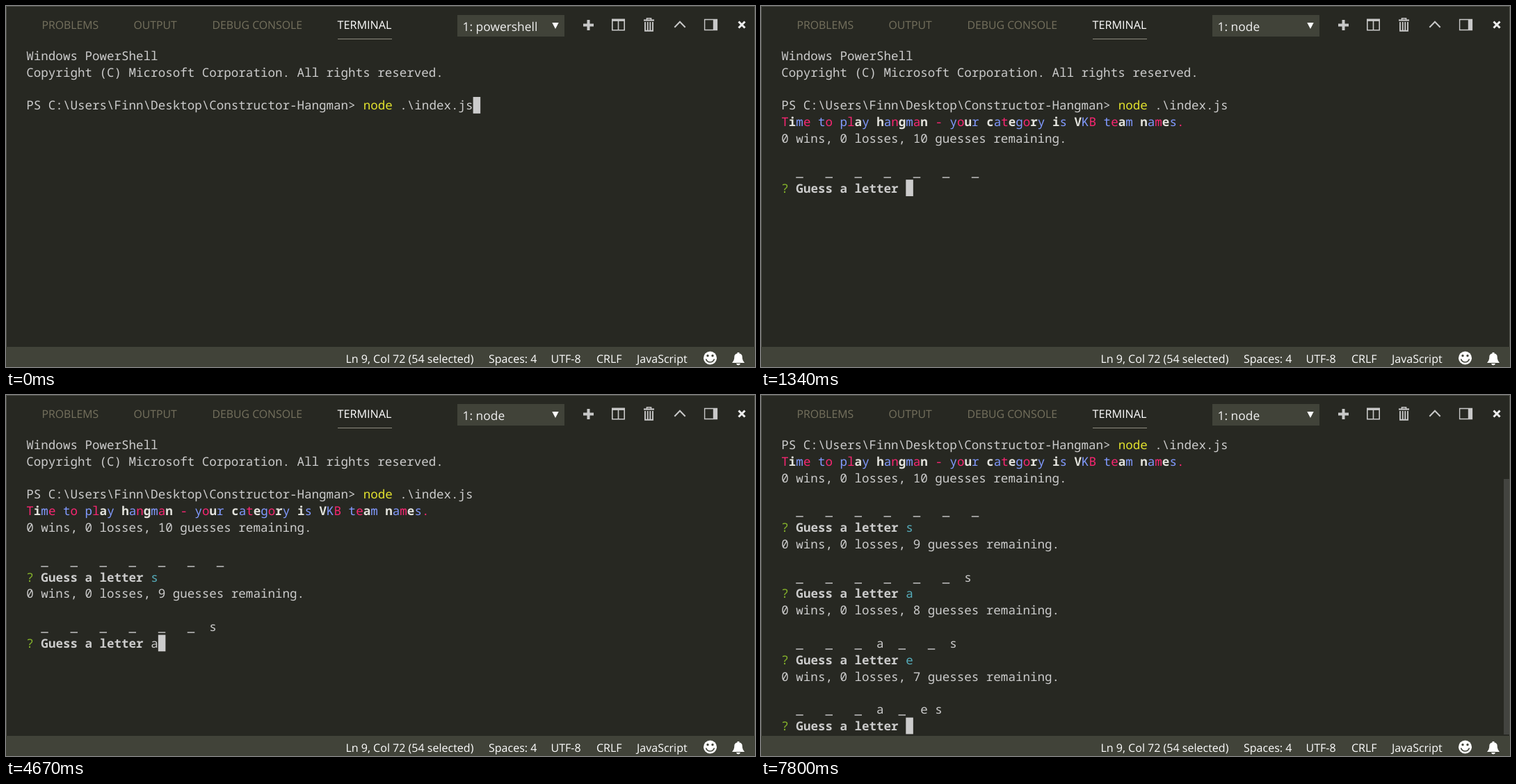
Write an HTML page that moves like this. It is 1077x520 px and loops after 8 s.

```html
<!DOCTYPE html>
<html lang="en">
<head>
<meta charset="utf-8">
<title>Terminal hangman</title>
<style>
  html, body { margin: 0; width: 100%; height: 100%; overflow: hidden; background: #272822; }
  svg { display: block; width: 100%; height: 100%; }
  text { white-space: pre; text-rendering: geometricPrecision; }
  .ui { font-family: "Open Sans", "Noto Sans", sans-serif; }
  .tabs { font-size: 15.8px; fill: #75715e; }
  .tabs .on { font-size: 16.2px; fill: #fff; }
  .status { font-size: 16.05px; fill: #fff; }
  #shell { font-size: 17.4px; fill: #f0f0f0; }
  #term { font: 500 17.55px "Noto Sans Mono", "DejaVu Sans Mono", monospace; fill: #ccc; }
  #term .bold { font-weight: 700; }
  #term .white { font-weight: 700; fill: #e3e3dd; }
  .red { fill: #f92672; }
  .blue { fill: #819aff; }
  .yellow { fill: #e2e22e; }
  .green { fill: #86b42b; }
  .cyan { fill: #56adbc; }
</style>
</head>
<body>
<svg viewBox="0 0 1077 520" xmlns="http://www.w3.org/2000/svg">
  <rect width="1077" height="520" fill="#272822"/>
  <path d="M0.5 491V0.5H1076.5V491" fill="none" stroke="#50514a"/>

  <g class="ui tabs">
    <text x="51.5" y="33">PROBLEMS</text>
    <text x="183.5" y="33">OUTPUT</text>
    <text x="296.5" y="33">DEBUG CONSOLE</text>
    <text x="476.5" y="33" class="on">TERMINAL</text>
  </g>
  <rect x="477" y="47" width="78" height="1" fill="#8f8d80"/>

  <rect x="649" y="13" width="154" height="31" fill="#414339"/>
  <text id="shell" class="ui" x="656.5" y="36"></text>
  <path d="M785.3 24H794.7L790 33Z" fill="#fff"/>

  <g fill="none" stroke="#c8c8c8">
    <path d="M837.5 20V35M830 27.5H845" stroke-width="4"/>
    <path d="M871.8 20V34.7H889.2V20M880.5 20V35" stroke-width="1.6"/>
    <path d="M871 20.2H890" stroke-width="3.4"/>
    <path d="M917 20.5H932" stroke-width="2.2"/>
    <path d="M921.5 20V17.8H927.5V20" stroke-width="1.6"/>
    <path d="M919 23V35.8H930V23M922.7 23V35M926.3 23V35" stroke-width="1.9"/>
    <path d="M961.3 30.7L969 22.7L976.7 30.7" stroke-width="2"/>
    <path d="M1004.6 19.5H1022.4V34.5H1004.6Z" stroke-width="1.4"/>
    <path d="M1019.8 19V35" stroke-width="6"/>
    <path d="M1053.5 22.5L1062.5 31.5M1062.5 22.5L1053.5 31.5" stroke="#eee" stroke-width="3"/>
  </g>

  <g id="term"></g>
  <rect id="cursor" fill="#ccc"/>
  <rect id="scrollbar" x="1068" y="121" width="8" height="368" fill="#434440"/>

  <rect y="491" width="1077" height="29" fill="#414339"/>
  <g class="ui status">
    <text x="488.5" y="514">Ln 9, Col 72 (54 selected)</text>
    <text x="694" y="514">Spaces: 4</text>
    <text x="783.5" y="514">UTF-8</text>
    <text x="849" y="514">CRLF</text>
    <text x="907" y="514">JavaScript</text>
  </g>
  <circle cx="1012.5" cy="507" r="9.5" fill="#fff"/>
  <g fill="#414339">
    <circle cx="1009" cy="503.8" r="1.7"/>
    <circle cx="1016" cy="503.8" r="1.7"/>
  </g>
  <path d="M1006.5 508.5Q1008 513 1012.5 513T1018.5 508.5" fill="none" stroke="#414339" stroke-width="1.7"/>
  <path d="M1044 514Q1047.3 511 1047.3 505.5Q1047.3 501.3 1051.6 500.5V499H1054.4V500.5Q1058.7 501.3 1058.7 505.5Q1058.7 511 1062 514ZM1050 515H1056Q1055.5 517.4 1053 517.4T1050 515Z" fill="#fff"/>
</svg>
<script>
const LOOP = 8000, LEFT = 29.3, TOP = 59.5, CELL_W = 10.53, CELL_H = 23.83, BASELINE = 18.5;
const TITLE = "Time to play hangman - your category is VKB team names.";

// Each round: letters known, when the prompt opens, when its key is typed.
const ROUNDS = [
  { word: "_______", open: 1340, key: "s", typed: 2930 },
  { word: "______s", open: 3490, key: "a", typed: 4670 },
  { word: "___a__s", open: 5190, key: "e", typed: 7160 },
  { word: "___a_es", open: 7800, key: "", typed: Infinity }
];
const LAUNCH = 410, GREET = 1190, VISIBLE_ROWS = 18;
const STEPS = [0, LAUNCH, GREET, ...ROUNDS.flatMap(r => [r.open, r.typed])];

const byId = id => document.getElementById(id);
const term = byId("term"), cursor = byId("cursor");

const setAttrs = (el, attrs) => {
  for (const name in attrs) el.setAttribute(name, attrs[name]);
};

const flag = [...TITLE].map((c, i) => [c, ["red", "white", "blue"][i % 3]]);
const tally = n => [[`0 wins, 0 losses, ${10 - n} guesses remaining.`]];
const spaced = word => [[[...word].map(c => c === "_" ? "  _ " : " " + c).join("")]];

// Rows of [text, class] runs; the cursor sits after the last run.
function screen(t) {
  const rows = [
    [["Windows PowerShell"]],
    [["Copyright (C) Microsoft Corporation. All rights reserved."]],
    [],
    [["PS C:\\Users\\Finn\\Desktop\\Constructor-Hangman> "], ["node", "yellow"], [" .\\index.js"]]
  ];
  if (t >= LAUNCH && t < GREET) rows.push([]);
  if (t < GREET) return rows;
  rows.push(flag);
  ROUNDS.forEach((round, i) => {
    const begin = i ? round.open : GREET;
    if (t < begin) return;
    rows.push(tally(i), [], spaced(round.word));
    if (t < round.open) return void rows.push([]);
    const prompt = [["?", "green"], [" "], ["Guess a letter", "bold"], [" "]];
    const next = ROUNDS[i + 1];
    if (t >= round.typed) prompt.push([round.key, next && t >= next.open ? "cyan" : ""]);
    rows.push(prompt);
  });
  return rows;
}

function addRun(text, style, col, row) {
  const el = document.createElementNS("http://www.w3.org/2000/svg", "text");
  setAttrs(el, { x: LEFT + col * CELL_W, y: TOP + row * CELL_H + BASELINE, class: style || "" });
  el.textContent = text;
  term.append(el);
}

function draw(t) {
  const all = screen(t);
  const rows = all.slice(-VISIBLE_ROWS);
  let col = 0;
  term.replaceChildren();
  rows.forEach((runs, row) => {
    col = 0;
    for (const [text, style] of runs) {
      if (text.trim()) addRun(text, style, col, row);
      col += text.length;
    }
  });
  setAttrs(cursor, {
    x: LEFT + col * CELL_W, y: TOP + (rows.length - 1) * CELL_H,
    width: CELL_W, height: CELL_H
  });
  byId("shell").textContent = t < LAUNCH ? "1: powershell" : "1: node";
  byId("scrollbar").style.display = all.length > VISIBLE_ROWS ? "" : "none";
}

const start = performance.now();
let shown = -1;
function tick() {
  const t = (performance.now() - start) % LOOP;
  const step = STEPS.filter(s => s <= t).length;
  if (step !== shown) draw(t);
  shown = step;
  requestAnimationFrame(tick);
}
tick();
</script>
</body>
</html>
```
